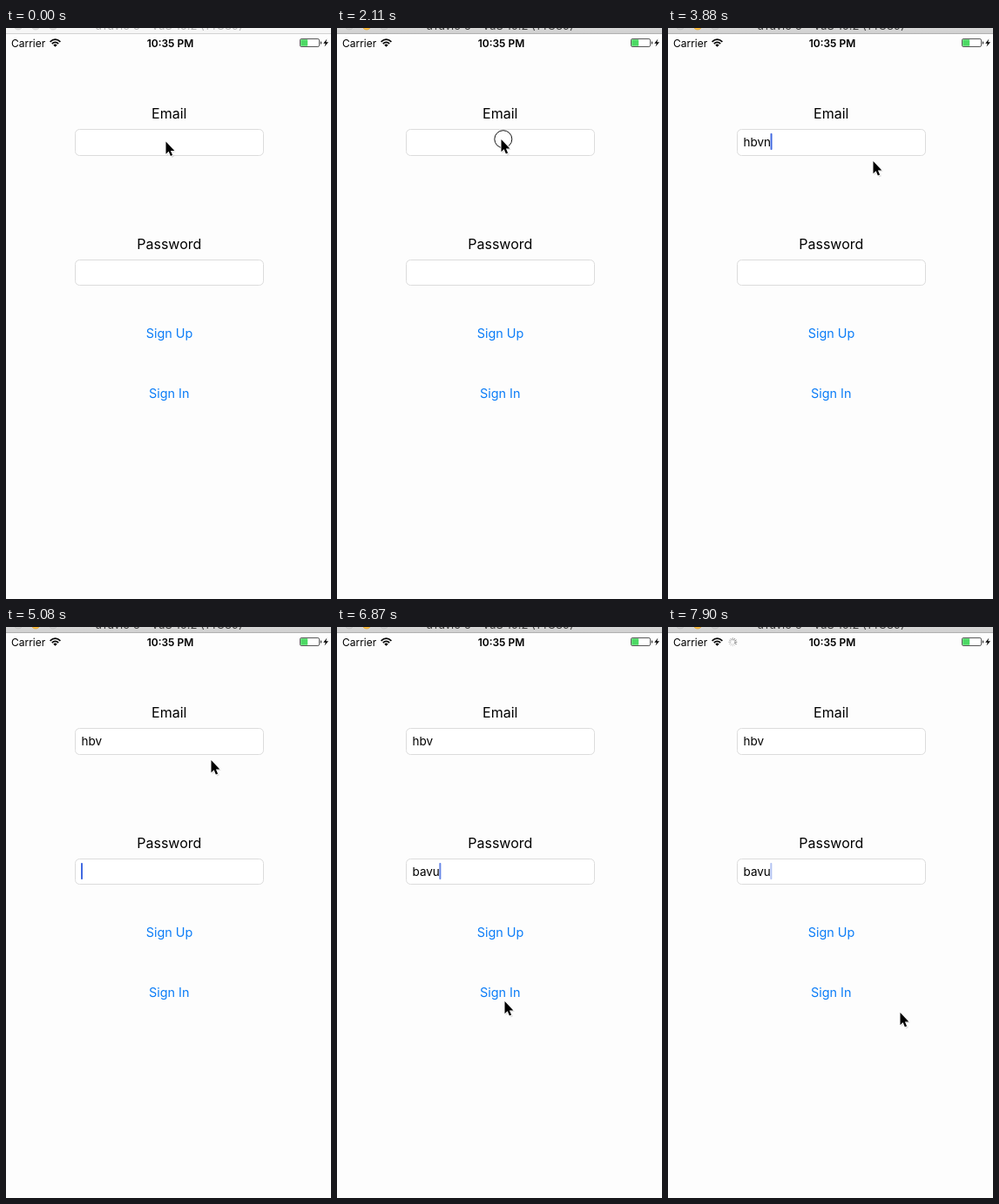
Write an HTML page that moves like this. It is 373 px wide and 656 px high and loops after 8000 ms.

```html
<!DOCTYPE html>
<html lang="en">
<head>
<meta charset="utf-8">
<title>Sign in form</title>
<style>
  html, body { margin: 0; width: 100%; height: 100%; overflow: hidden; background: #fdfdfd; }
  svg { display: block; width: 373px; height: 656px; }
  text { font-family: Inter, "Open Sans", sans-serif; white-space: pre; }
  .mid { text-anchor: middle; }
  .label { font-size: 16px; }
  .link { font-size: 14.4px; fill: #0a7cf7; }
  .value { font-size: 13.5px; }
  .status { font-size: 12px; }
  .field { fill: #fff; stroke: #dcdcdc; }
</style>
</head>
<body>
<svg viewBox="0 0 373 656">
  <defs>
    <linearGradient id="shade" x2="0" y2="1">
      <stop offset="0" stop-color="#d8d8d8"/>
      <stop offset="1" stop-color="#d0d0d0"/>
    </linearGradient>
  </defs>
  <rect width="373" height="656" fill="#fdfdfd"/>

  <rect id="bar" width="373" height="6"/>
  <rect id="edge" y="6" width="373" height="1"/>
  <g id="lights" stroke-width=".7">
    <circle cx="14" cy="-3" r="5"/>
    <circle cx="34" cy="-3" r="5"/>
    <circle cx="54" cy="-3" r="5"/>
  </g>
  <text id="title" class="mid" x="187" y="1.5" font-size="13">uTavio 6 – vuS 10.2 (14C89)</text>

  <text class="status" x="6" y="21.5">Carrier</text>
  <g fill="none" stroke="#000" stroke-width="1.7">
    <path d="M50.6 15.8Q56.5 10.6 62.4 15.8"/>
    <path d="M52.8 18Q56.5 14.8 60.2 18"/>
  </g>
  <path d="M54.3 19.4Q56.5 17.7 58.7 19.4L56.5 21.7Z"/>
  <g id="spinner" transform="translate(74.3 17.3)" stroke="#444" stroke-width="1" stroke-linecap="round"></g>
  <text class="status mid" x="188.5" y="21.5" font-weight="600">10:35 PM</text>
  <rect x="337.5" y="12.5" width="22" height="9" rx="1.6" fill="#fff" stroke="#444" stroke-width=".9"/>
  <rect x="338.2" y="13.2" width="8" height="7.6" rx=".6" fill="#4cd964"/>
  <path d="M360.8 15.2q1.5 .3 1.5 1.8t-1.5 1.8z" fill="#333"/>
  <path d="M368.4 12.5L364.2 17.7H366.8L365.5 21.5L370 16.2H367.2Z"/>

  <text class="label mid" x="187.3" y="104">Email</text>
  <rect class="field" x="79.5" y="116.5" width="216" height="30" rx="5"/>
  <text id="email" class="value" x="86.5" y="136"></text>
  <text class="label mid" x="187.3" y="253.5">Password</text>
  <rect class="field" x="79.5" y="266.5" width="216" height="29" rx="5"/>
  <text id="pass" class="value" x="86.5" y="285.7"></text>
  <rect id="caret" width="2" height="19" rx=".8" fill="#4169e1"/>
  <text class="link mid" x="187.5" y="355.7">Sign Up</text>
  <text id="signIn" class="link mid" x="187.2" y="424.7">Sign In</text>

  <g id="pointer">
    <circle id="ring" cx="2.3" cy="-.3" r="10" fill="none" stroke="#111"/>
    <path d="M1 2V16L4.4 13L6.8 18.4L9.4 17.2L7 12H11.4Z" fill="#000" opacity=".13"/>
    <path d="M0 0V14.2L3.2 11.3L5.4 16.4L7.6 15.5L5.4 10.4H9.9Z" stroke="#fff" stroke-width="1.6" paint-order="stroke" stroke-linejoin="round"/>
  </g>
</svg>
<script>
  const LOOP = 8000, SPOKES = 12;
  const $ = id => document.getElementById(id);
  const el = Object.fromEntries(
    ["bar", "edge", "lights", "title", "spinner", "email", "pass", "caret", "signIn", "pointer", "ring"]
      .map(id => [id, $(id)]));

  // Each step lists only what changes at that time.
  const steps = [
    [0, { at: [183.5, 130.5], email: "", pass: "", focus: "email", caret: 0, ring: 0, active: 0, spin: -1, press: 0 }],
    [450, { at: [187, 129] }],
    [600, { at: [188.5, 128] }],
    [2110, { active: 1, ring: 1 }],
    [2250, { ring: 0, caret: .5 }],
    [2400, { caret: 1 }],
    [2700, { at: [200, 134], caret: .7 }],
    [2850, { at: [227, 149], caret: .3 }],
    [2990, { at: [235.5, 153], caret: 0 }],
    [3440, { email: "h", caret: 1 }],
    [3590, { email: "hb" }],
    [3740, { email: "hbv" }],
    [3880, { email: "hbvn" }],
    [4030, { caret: .9 }],
    [4630, { email: "hbv", caret: 1 }],
    [5080, { focus: "pass" }],
    [5680, { pass: "bav" }],
    [5830, { pass: "bavu" }],
    [6430, { at: [233, 205] }],
    [6570, { at: [222, 345], caret: .5 }],
    [6720, { at: [203, 457], caret: .2 }],
    [6870, { at: [192.5, 430], caret: .8 }],
    [7020, { at: [189, 424], caret: 1 }],
    [7160, { at: [188, 422] }],
    [7460, { ring: 1, press: 1, caret: .7 }],
    [7610, { ring: 0, press: 0, spin: 0, caret: .2 }],
    [7750, { at: [226, 433], spin: 2, caret: 0 }],
    [7900, { at: [266.5, 443], spin: 4, caret: .4 }]
  ];
  let last = {};
  const states = steps.map(([time, change]) => ({ time, ...(last = { ...last, ...change }) }));

  for (let i = 0; i < SPOKES; i++) {
    const a = i * 2 * Math.PI / SPOKES, x = Math.sin(a), y = -Math.cos(a);
    const line = document.createElementNS("http://www.w3.org/2000/svg", "path");
    line.setAttribute("d", `M${x * 2.6} ${y * 2.6}L${x * 4.6} ${y * 4.6}`);
    el.spinner.append(line);
  }

  const set = (node, attrs) => {
    for (const key in attrs) node.setAttribute(key, attrs[key]);
  };

  function draw(s) {
    set(el.bar, { fill: s.active ? "url(#shade)" : "#f6f6f6" });
    set(el.edge, { fill: s.active ? "#b1b1b1" : "#d2d2d2" });
    set(el.title, { fill: s.active ? "#404040" : "#b5b5b5" });
    [...el.lights.children].forEach((c, i) => {
      const lit = s.active && i === 1;
      set(c, {
        fill: lit ? "#fdbd3e" : s.active ? "#cfcfcf" : "#dcdcdc",
        stroke: lit ? "#dfa023" : s.active ? "#bdbdbd" : "#cecece"
      });
    });

    el.email.textContent = s.email;
    el.pass.textContent = s.pass;
    set(el.caret, {
      x: 86 + el[s.focus].getComputedTextLength(),
      y: s.focus === "email" ? 121 : 271,
      opacity: s.caret
    });

    set(el.signIn, { opacity: s.press ? .25 : 1 });
    set(el.ring, { opacity: s.ring });
    set(el.pointer, { transform: `translate(${s.at})` });
    set(el.spinner, { opacity: s.spin < 0 ? 0 : 1 });
    [...el.spinner.children].forEach((line, i) => {
      const age = (s.spin + SPOKES - i) % SPOKES;
      set(line, { opacity: Math.max(.2, .75 - age * .06) });
    });
  }

  const start = performance.now();
  let shown;
  function tick() {
    const t = (performance.now() - start) % LOOP;
    const state = states.findLast(s => s.time <= t) || states[0];
    if (state !== shown) draw(shown = state);
    requestAnimationFrame(tick);
  }
  tick();
</script>
</body>
</html>
```
